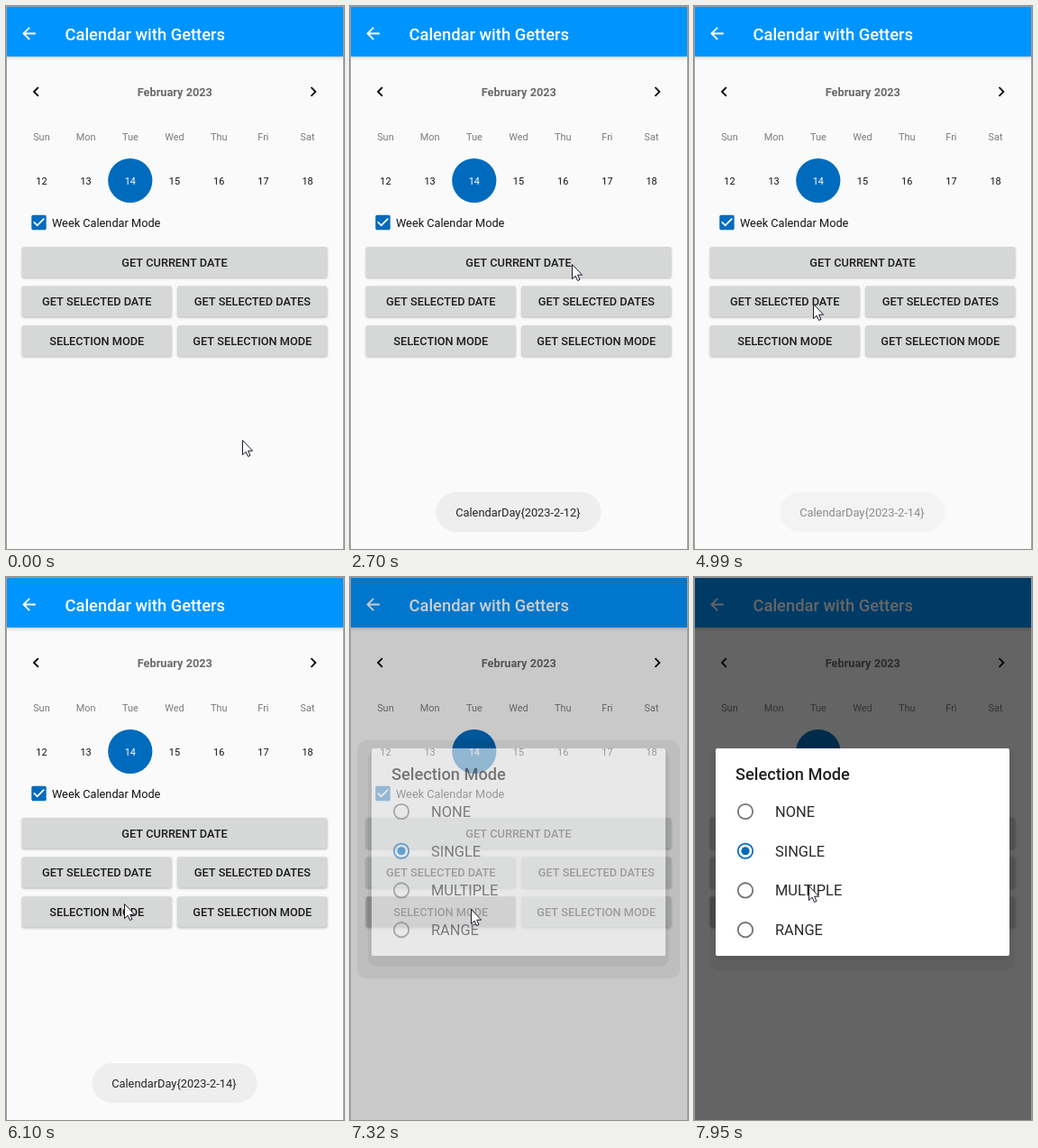
These frames come from a looping animation (375 by 602 pixels, 8 s). An HTML page with a canvas:

```html
<!DOCTYPE html>
<html lang="en">
<head>
<meta charset="utf-8">
<title>Calendar with Getters</title>
<style>
  html, body { margin: 0; width: 100%; height: 100%; overflow: hidden; background: #fafafa; }
  canvas { display: block; }
</style>
</head>
<body>
<canvas id="stage" width="375" height="602"></canvas>
<script>
const ctx = document.getElementById('stage').getContext('2d');
const LOOP = 8000;
const TICK = 120; // motion is held for this many ms
const DP = 0.911; // pixels per density-independent unit
const BLUE = '#006bbd';

const icons = {
  back: 'M20 11H7.83l5.59-5.59L12 4l-8 8 8 8 1.41-1.41L7.83 13H20v-2z',
  left: 'M15.41 7.41L14 6l-6 6 6 6 1.41-1.41L10.83 12z',
  right: 'M10 6L8.59 7.41 13.17 12l-4.58 4.59L10 18l6-6z',
  check: 'M19 3H5c-1.11 0-2 .9-2 2v14c0 1.1.89 2 2 2h14c1.11 0 2-.9 2-2V5c0-1.1-.89-2-2-2z' +
    'm-9 14l-5-5 1.41-1.41L10 14.17l7.59-7.59L19 8l-9 9z'
};
const pointer = new Path2D('M.5.5V16.6L4.1 13.2 6.6 18.5 9 17.4 6.6 12.2H11.6Z');

const buttonRows = [
  ['GET CURRENT DATE'],
  ['GET SELECTED DATE', 'GET SELECTED DATES'],
  ['SELECTION MODE', 'GET SELECTION MODE']
];
const toasts = [
  { day: 12, show: 2220, hide: 3330 },
  { day: 14, show: 4870, hide: 6220 }
];
const cursorMoves = [
  { from: 120, to: 600, x: 250, y: 254 },
  { from: 720, to: 840, x: 246, y: 286 },
  { from: 3210, to: 3810, x: 132, y: 330 },
  { from: 6100, to: 6100, x: 131, y: 362 },
  { from: 6220, to: 6340, x: 134, y: 368 },
  { from: 7700, to: 7700, x: 131, y: 318 },
  { from: 7950, to: 7950, x: 127, y: 342 }
];

// Stepped 0..1: the first step lands at `from`, the last one at `to`.
function progress(t, from, to) {
  const done = Math.floor((t - from) / TICK) + 1;
  const steps = Math.round((to - from) / TICK) + 1;
  return Math.min(1, Math.max(0, done / steps));
}
const smooth = p => p * p * (3 - 2 * p);

function text(str, x, y, size, color, weight = 400, align = 'center') {
  ctx.font = `${weight} ${size * DP}px Roboto, sans-serif`;
  ctx.textAlign = align;
  ctx.fillStyle = color;
  ctx.fillText(str, x, y);
}

function box(x, y, w, h, r, color) {
  ctx.fillStyle = color;
  ctx.beginPath();
  ctx.roundRect(x, y, w, h, r);
  ctx.fill();
}

function disc(x, y, r, color) {
  ctx.fillStyle = color;
  ctx.beginPath();
  ctx.arc(x, y, r, 0, 7);
  ctx.fill();
}

function icon(name, x, y, color) {
  ctx.save();
  ctx.translate(x, y);
  ctx.scale(DP, DP);
  ctx.translate(-12, -12);
  ctx.fillStyle = color;
  ctx.fill(new Path2D(icons[name]));
  ctx.restore();
}

function withShadow(alpha, blur, draw) {
  ctx.save();
  ctx.shadowColor = `rgba(0,0,0,${alpha})`;
  ctx.shadowBlur = blur;
  ctx.shadowOffsetY = 1;
  draw();
  ctx.restore();
}

function pressOf(label, t) {
  if (label === 'GET CURRENT DATE') return progress(t, 1980, 2100) - progress(t, 2220, 2340);
  if (label === 'SELECTION MODE') return progress(t, 7080, 7200);
  return 0;
}

function drawButtons(t) {
  const gap = 6.5;
  buttonRows.forEach((labels, row) => {
    const w = (338.5 - gap * (labels.length - 1)) / labels.length;
    const y = 267 + row * 43.6;
    labels.forEach((label, col) => {
      const x = 17.8 + col * (w + gap);
      withShadow(.28, 2.5, () => box(x, y, w, 34, 2, '#d6d7d7'));
      box(x, y, w, 34, 2, `rgba(0,0,0,${.14 * pressOf(label, t)})`);
      text(label, x + w / 2, y + 21.6, 14, '#1d1d1d', 500);
    });
  });
}

function drawPage(t) {
  box(0, 0, 375, 602, 0, '#fafafa');
  withShadow(.22, 4, () => box(0, 0, 375, 56, 0, '#0094ff'));
  icon('back', 25.5, 30.5, '#fff');
  text('Calendar with Getters', 65.5, 38, 20.15, '#fff', 500, 'left');

  icon('left', 33.4, 95, '#000');
  icon('right', 341, 95, '#000');
  text('February 2023', 187.3, 100, 14, '#6b6b6b', 700);

  disc(137.8, 193.5, 24.6, BLUE);
  ['Sun', 'Mon', 'Tue', 'Wed', 'Thu', 'Fri', 'Sat'].forEach((day, i) => {
    const x = 39.4 + i * 49.2;
    text(day, x, 148.7, 12, '#7c7c7c');
    text(12 + i, x, 198, 12, i === 2 ? '#fff' : '#111');
  });

  icon('check', 36.5, 240, BLUE);
  text('Week Calendar Mode', 51, 244.8, 14, '#111', 400, 'left');
  drawButtons(t);
}

function drawToast({ day, show, hide }, t) {
  const fade = 3 * TICK;
  ctx.globalAlpha = progress(t, show, show + fade) - progress(t, hide, hide + fade);
  box(95.5, 539, 183, 44, 22, '#eeeeee');
  text(`CalendarDay{2023-2-${day}}`, 117.2, 566.3, 14.08, '#242424', 400, 'left');
  ctx.globalAlpha = 1;
}

// Soft edge around the dialog, left out beneath it.
function shadowRing(side, up, down) {
  ctx.fillStyle = 'rgba(0,0,0,.055)';
  ctx.beginPath();
  ctx.roundRect(24 - side, 190 - up, 326 + 2 * side, 230 + up + down, 10);
  ctx.rect(24, 190, 326, 230);
  ctx.fill('evenodd');
}

function drawDialog(t) {
  const p = progress(t, 7320, 7440);
  if (!p) return;
  const alpha = p ** .8;
  box(0, 0, 375, 602, 0, `rgba(0,0,0,${.6 * alpha * alpha})`);
  shadowRing(26 - 20 * p, 18 - 18 * p, 34 - 18 * p);
  shadowRing(7 - 6 * p, 0, 19 - 14 * p);

  ctx.globalAlpha = alpha;
  box(24, 190, 326, 230, 2, '#fff');
  text('Selection Mode', 46, 225.3, 20, '#212121', 500, 'left');
  ['NONE', 'SINGLE', 'MULTIPLE', 'RANGE'].forEach((mode, i) => {
    const y = 260 + i * 43.73;
    const color = i === 1 ? BLUE : '#757575';
    ctx.strokeStyle = color;
    ctx.lineWidth = 1.8;
    ctx.beginPath();
    ctx.arc(57, y, 8.2, 0, 7);
    ctx.stroke();
    if (i === 1) disc(57, y, 4.6, color);
    text(mode, 90, y + 6, 18, '#2b2b2b', 400, 'left');
  });
  ctx.globalAlpha = 1;
}

function drawCursor(t) {
  let x = 262, y = 481;
  for (const move of cursorMoves) {
    const p = smooth(progress(t, move.from, move.to));
    x += (move.x - x) * p;
    y += (move.y - y) * p;
  }
  ctx.save();
  ctx.translate(Math.round(x), Math.round(y));
  ctx.fillStyle = '#fff';
  ctx.fill(pointer);
  ctx.strokeStyle = '#1c1c2c';
  ctx.lineWidth = 1;
  ctx.stroke(pointer);
  ctx.restore();
}

function frame(now) {
  const t = now % LOOP;
  drawPage(t);
  toasts.forEach(toast => drawToast(toast, t));
  drawDialog(t);
  ctx.strokeStyle = '#a0a0a0';
  ctx.lineWidth = 1;
  ctx.strokeRect(.5, .5, 374, 610);
  drawCursor(t);
  requestAnimationFrame(frame);
}
requestAnimationFrame(frame);
</script>
</body>
</html>
```
